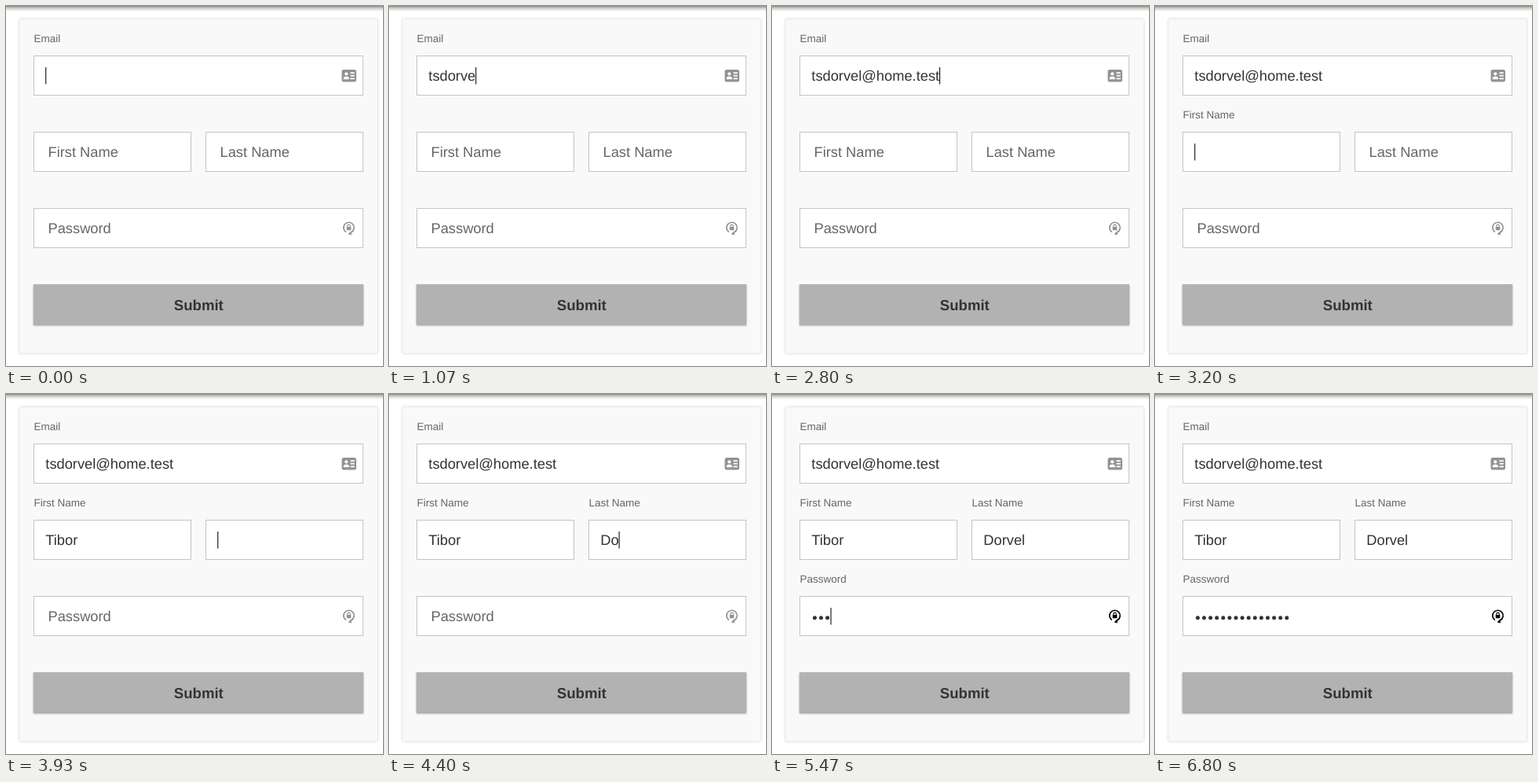
Animation, 480 px wide and 458 px high, one loop 6990 ms. Source, as an HTML page:

```html
<!DOCTYPE html>
<html lang="en">
<head>
<meta charset="utf-8">
<title>Sign-up form</title>
<style>
  html, body { margin: 0; width: 100%; height: 100%; overflow: hidden; background: #fff; }
  svg { display: block; width: 480px; height: 458px; }
  text { font: 18.3px "Liberation Sans", Arial, sans-serif; fill: #333; text-rendering: geometricPrecision; }
  .hint { fill: #666; }
  .label { font-size: 13.5px; fill: #666; }
  .submit { font-size: 18.6px; font-weight: bold; text-anchor: middle; }
  .box { fill: #fff; stroke: #c4c4c4; }
  .card { fill: #f9f9f9; stroke: #ececec; filter: drop-shadow(0 0 1.5px #0002); }
  .button { fill: #b2b2b2; filter: drop-shadow(0 1px 1px #0006); }
</style>
</head>
<body>
<svg viewBox="0 0 480 458">
  <defs>
    <linearGradient id="shade" x2="0" y2="1">
      <stop stop-color="#8c8c8c"/>
      <stop offset=".4" stop-color="#cfcfcf"/>
      <stop offset="1" stop-color="#fff"/>
    </linearGradient>
  </defs>
  <rect width="480" height="7" fill="url(#shade)"/>
  <rect class="card" x="17" y="16.5" width="456.5" height="425.5" rx="2"/>
  <rect class="button" x="35" y="354" width="420" height="51.5"/>
  <text class="submit" x="245.3" y="386.5">Submit</text>
  <g id="form"></g>
  <g id="contact" transform="translate(427.5 81)">
    <rect width="18.5" height="15.5" rx="2.5" fill="#929292"/>
    <g fill="#fff">
      <circle cx="5.8" cy="5.3" r="2.1"/>
      <path d="M2.3 12.3V10.6Q2.5 8.6 5.8 8.4Q9.1 8.6 9.3 10.6V12.3Z"/>
      <path d="M11 3.2h5.3v1.8H11zM11 6.8h5.3v1.8H11zM11 10.4h5.3v1.8H11z"/>
    </g>
  </g>
  <g id="lock" transform="translate(436.5 282)">
    <path d="M-3.6 5.6A6.7 6.7 0 1 1 3.2 5.8L.6 7.8" fill="none" stroke="currentColor" stroke-width="1.7"/>
    <path d="M-.9 8.4L3 4.6L3.4 9.6Z" fill="currentColor"/>
    <rect x="-2.8" y="-1" width="5.6" height="4.2" rx=".5" fill="currentColor"/>
    <path d="M-1.7 -1V-2.2A1.7 1.7 0 0 1 1.7 -2.2V-1" fill="none" stroke="currentColor" stroke-width="1.1"/>
  </g>
  <rect id="caret" width="1.2" height="21.5" fill="#222"/>
</svg>
<script>
const LOOP = 6990, SLIDE = 250, RISE = 20;
const caretOff = [[330, 530], [1930, 2270], [6800, LOOP]];
const form = document.getElementById('form');
const caret = document.getElementById('caret');
const lock = document.getElementById('lock');

// keys: the moment each character is typed
const fields = [
  { label: 'Email', x: 35.5, y: 63.5, w: 419, focus: -SLIDE, value: 'tsdorvel@home.test',
    keys: [470, 600, 670, 800, 870, 930, 1070, 1270, 1470, 1730, 1800, 1870, 2000, 2200, 2530, 2600, 2670, 2800] },
  { label: 'First Name', x: 35.5, y: 160.5, w: 200, focus: 2930, value: 'Tibor',
    keys: [3400, 3530, 3600, 3670, 3800] },
  { label: 'Last Name', x: 254.5, y: 160.5, w: 200, focus: 3930, value: 'Dorvel',
    keys: [4270, 4400, 4470, 4530, 4600, 4730] },
  { label: 'Password', x: 35.5, y: 257.5, w: 419, focus: 5070, secret: true,
    keys: [5330, 5470, 5470, 5600, 5670, 5670, 5800, 5870, 5870, 6000, 6070, 6070, 6200, 6330, 6330] }
];

function add(tag, attrs, content = '') {
  const node = document.createElementNS('http://www.w3.org/2000/svg', tag);
  for (const name in attrs) node.setAttribute(name, attrs[name]);
  node.textContent = content;
  return form.appendChild(node);
}

for (const f of fields) {
  const { x, y, w, label } = f;
  add('rect', { class: 'box', x, y, width: w, height: 50 });
  f.hint = add('text', { class: 'hint', x: x + 18, y: y + 31.5 }, label);
  f.title = add('text', { class: 'label', x, y: y - 17.5 }, label);
  if (f.secret) {
    f.dots = f.keys.map((_, i) => add('circle', { cx: x + 18.9 + 8.1 * i, cy: y + 27.3, r: 2.5, fill: '#333' }));
  } else {
    f.text = add('text', { x: x + 14.8, y: y + 31.5 });
  }
}

function draw(t) {
  let active;
  for (const f of fields) {
    const focused = t >= f.focus;
    const p = Math.min(1, Math.max(0, (t - f.focus) / SLIDE));
    const eased = 1 - (1 - p) ** 2;
    f.hint.setAttribute('opacity', focused ? 0 : 1);
    f.title.setAttribute('opacity', eased);
    f.title.setAttribute('transform', `translate(0 ${RISE * (1 - eased)})`);
    f.count = f.keys.filter(k => k <= t).length;
    if (f.secret) f.dots.forEach((dot, i) => dot.setAttribute('opacity', i < f.count ? 1 : 0));
    else f.text.textContent = f.value.slice(0, f.count);
    if (focused) active = f;
  }
  const typed = active.secret ? 8.1 * active.count : active.text.getComputedTextLength();
  caret.setAttribute('x', active.x + 14.6 + typed);
  caret.setAttribute('y', active.y + 14.5);
  caret.setAttribute('opacity', caretOff.some(([from, to]) => t >= from && t < to) ? 0 : 1);
  lock.setAttribute('color', active.secret ? '#000' : '#929292');
}

const start = performance.now();
function tick() {
  draw((performance.now() - start) % LOOP);
  requestAnimationFrame(tick);
}
tick();
</script>
</body>
</html>
```
